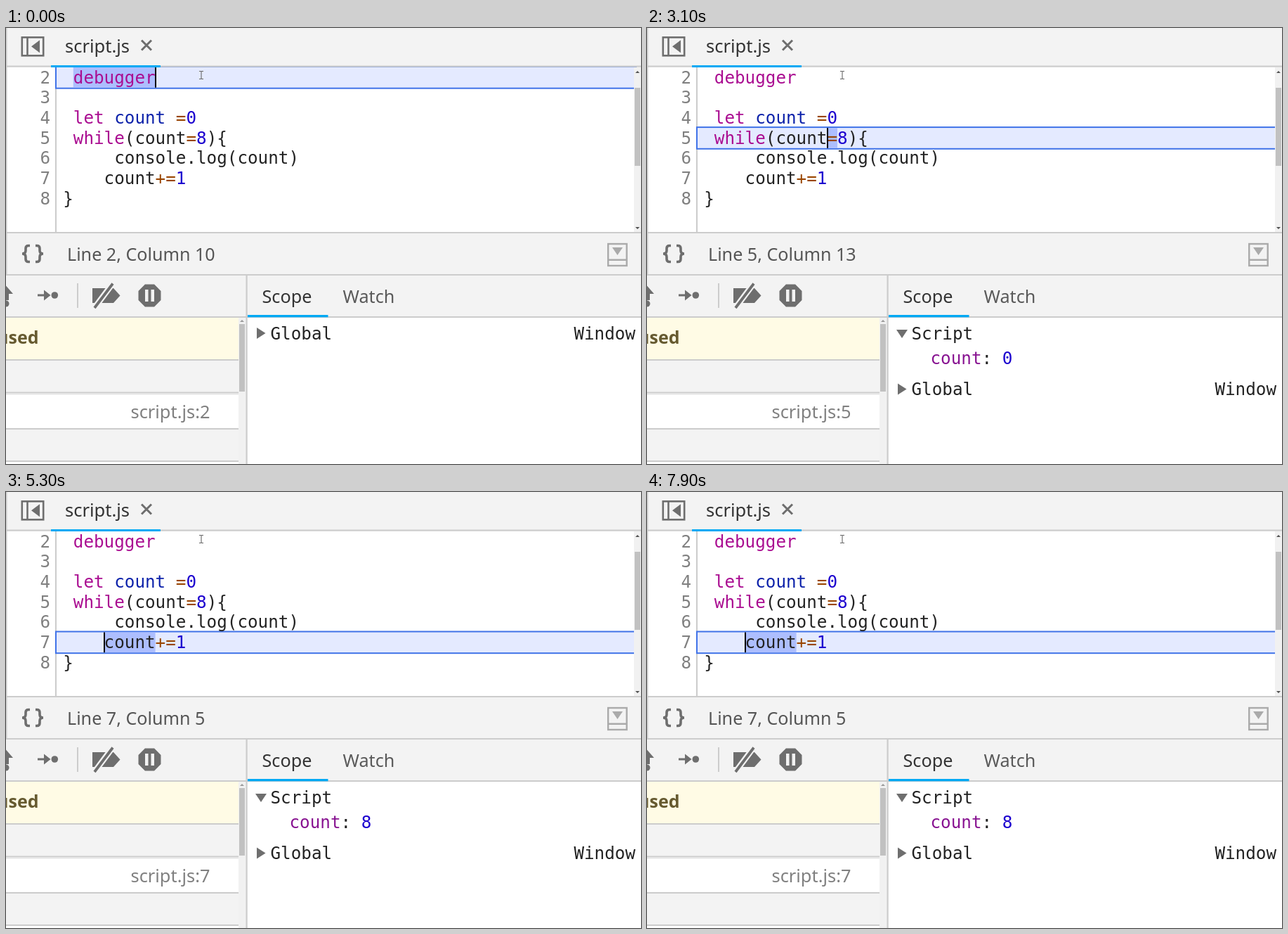
Recreate the animation shown at these times as an HTML page. Size 904x620 px, loop 8000 ms.

```html
<!DOCTYPE html>
<html lang="en">
<head>
<meta charset="utf-8">
<title>Stepping through a loop</title>
<style>
  html, body { margin: 0; width: 100%; height: 100%; overflow: hidden; background: #fff; }
  svg { display: block; width: 100vw; height: 100vh; }
  text { white-space: pre; font: 25.2px "Noto Sans", "Open Sans", sans-serif; fill: #333; }
  .mono { font: 24.25px "DejaVu Sans Mono", monospace; fill: #222; }
  .end { text-anchor: end; }
  .num { fill: #808080; }
  .note { font-style: italic; font-size: 25px; fill: #808080; }
  .kw { fill: #aa0d91; }
  .def { fill: #0d22aa; }
  .op { fill: #994500; }
  .val { fill: #1c00cf; }
  .prop { fill: #881391; }
  .bar { fill: #f3f3f3; }
  .rule { fill: #ccc; }
  .thumb { fill: #c1c1c1; }
  .blue { fill: #03a9f4; }
  .icon { fill: #6e6e6e; }
  .line { fill: none; stroke: #6e6e6e; stroke-width: 2.6; }
</style>
</head>
<body>
<svg viewBox="0 0 904 620">
  <rect width="904" height="620" fill="#fff"/>

  <!-- editor -->
  <rect class="rule" x="70" y="56" width="2" height="235"/>
  <g id="row">
    <rect x="71" y="-1" width="826" height="30.7" fill="#e4eaff" stroke="#4073e8" stroke-width="2"/>
    <rect id="mark" height="28.7" fill="#adbefe"/>
  </g>
  <g id="code"></g>
  <rect id="caret" width="2" height="28.7" fill="#000"/>
  <path d="M275 61.5h2.2l.8 .8 .8-.8h2.2M278 62v10M275 72.5h2.2l.8-.8 .8 .8h2.2" fill="none" stroke="#666" stroke-width="1.1"/>
  <rect x="894" y="56" width="10" height="235" fill="#f1f1f1"/>
  <rect class="thumb" x="895" y="85" width="8" height="111"/>
  <path d="M896 64l3-3 3 3zM896 283l3 3 3-3z" fill="#505050"/>

  <!-- tab strip -->
  <rect class="bar" width="904" height="54"/>
  <rect class="rule" y="53.5" width="904" height="2.2"/>
  <rect class="blue" x="64" y="53" width="156" height="3"/>
  <rect class="line" x="22.8" y="13.3" width="30.4" height="26"/>
  <path class="line" d="M30.5 13v27"/>
  <path class="icon" d="M36 26.3l12-9v18z"/>
  <text x="84" y="35" style="font-size:25.5px">script.js</text>
  <path class="line" d="M193 17.5l14 14M207 17.5l-14 14" style="stroke-width:3"/>

  <!-- status bar -->
  <rect class="bar" y="290" width="904" height="61"/>
  <rect class="rule" y="290" width="904" height="2"/>
  <path class="line" d="M34 309.5h-2q-4 0-4 4v3q0 4.500-5 4.500q5 0 5 4.500v3q0 4 4 4h2M42 309.500h2q4 0 4 4v3q0 4.500 5 4.500q-5 0-5 4.500v3q0 4-4 4h-2" style="stroke-width:3.600"/>
  <text id="status" x="87" y="330.500" style="font-size:25.100px;fill:#555"></text>
  <g fill="#aaa">
    <rect x="857.200" y="307" width="26.500" height="31" fill="none" stroke="#aaa" stroke-width="2.400"/>
    <path d="M863 312h15l-7.500 11zM857 328.500h27v2.400h-27z"/>
  </g>

  <!-- debugger toolbar -->
  <rect class="bar" y="350" width="904" height="61"/>
  <rect class="rule" y="350" width="904" height="2"/>
  <rect class="rule" y="410" width="904" height="2"/>
  <rect class="rule" width="1.500" height="351"/>
  <g class="icon">
    <path d="M0 366.500L10 378H4v9H0z"/>
    <circle cx="0" cy="392" r="4.500"/>
    <path d="M45 378.500h9v-6l9.500 7.500-9.500 7.500v-6h-9z"/>
    <circle cx="69.300" cy="380" r="4.800"/>
    <path d="M123 370h30l9.500 10.500-9.500 10.500h-30z"/>
    <path d="M197.900 364.500h13.200l9.400 9.400v13.200l-9.400 9.400h-13.200l-9.400-9.400v-13.200z"/>
  </g>
  <path d="M126 398L152 363" stroke="#f3f3f3" stroke-width="8.500"/>
  <path class="line" d="M126 398L152 363.500" style="stroke-width:3.800"/>
  <path d="M198 372h4.500v17H198zM206.500 372h4.500v17h-4.500z" fill="#f3f3f3"/>
  <rect class="rule" x="101" y="363" width="2" height="35"/>
  <text x="364.500" y="390.500">Scope</text>
  <text x="479.500" y="390.500" style="fill:#5a5a5a">Watch</text>
  <rect class="blue" x="344" y="408" width="114.500" height="3.300"/>

  <!-- call stack -->
  <rect y="412" width="331" height="60" fill="#fffbe5"/>
  <rect class="bar" y="472" width="331" height="47"/>
  <rect class="rule" y="471" width="331" height="2"/>
  <text class="end" x="46.500" y="449" style="font-size:25px;font-weight:700;fill:#665a30">Debugger paused</text>
  <rect class="rule" y="517.500" width="331" height="2"/>
  <g id="stack">
    <rect y="519.500" width="331" height="2" fill="#e6e6e6"/>
    <text id="place" class="end" x="290.500" y="555" style="font-size:25.400px;fill:#808080"></text>
    <rect class="bar" y="570" width="331" height="46"/>
    <rect class="rule" y="569" width="331" height="2"/>
    <rect class="rule" y="615" width="331" height="2"/>
  </g>
  <g id="idle">
    <text class="note end" x="122" y="557">Not paused</text>
    <rect class="bar" y="578" width="331" height="42"/>
    <rect class="rule" y="577" width="331" height="2"/>
    <text class="note" x="559" y="449">Not paused</text>
  </g>
  <rect x="331" y="412" width="11" height="208" fill="#f1f1f1"/>
  <path d="M333 418l3-3 3 3z" fill="#999"/>
  <rect id="thumb" class="thumb" x="332" y="421" width="8"/>
  <rect class="rule" x="341.500" y="351" width="2.200" height="269"/>

  <!-- scope -->
  <g id="script">
    <path class="icon" d="M355 429h16l-8 12z"/>
    <text class="mono" x="376.500" y="442.500">Script</text>
    <text class="mono" x="403.500" y="477.500"><tspan class="prop">count</tspan>: <tspan id="count" class="val"></tspan></text>
  </g>
  <g id="global">
    <path class="icon" d="M357 426v16l12.500-8z"/>
    <text class="mono" x="376.500" y="442.500">Global</text>
    <text class="mono end" x="896" y="442.500">Window</text>
  </g>
</svg>
<script>
const LOOP = 8000, LEFT = 81.2, CHAR = 14.6, ROW = 28.7;
const $ = id => document.getElementById(id);
const colX = col => LEFT + col * CHAR;
const rowY = line => 56 + (line - 2) * ROW;

const source = [' debugger', '', ' let count =0', ' while(count=8){',
  '     console.log(count)', '    count+=1', '}'];

// line: caret column, marked range
const stops = { 2: [9, 1, 9], 4: [12, 12, 13], 5: [12, 12, 13], 6: [5, 5, 12], 7: [4, 4, 9] };

// time, line, caret visible, paused, count
const steps = [
  [0, 2, 1, 1, null],
  [500, 2, 1, 0, null],
  [600, 2, 0, 0, null],
  [700, 4, 1, 1, null],
  [1200, 4, 0, 1, null],
  [1800, 4, 1, 1, null],
  [2300, 4, 0, 1, null],
  [3100, 5, 1, 1, 0],
  [3300, 5, 0, 1, 0],
  [3900, 5, 1, 1, 0],
  [4100, 5, 1, 0, 0],
  [4200, 6, 1, 1, 8],
  [4700, 6, 0, 1, 8],
  [5300, 7, 1, 1, 8],
  [5800, 7, 0, 1, 8],
  [6100, 7, 0, 0, 8],
  [6200, 5, 1, 1, 9],
  [6700, 5, 0, 1, 9],
  [7100, 6, 1, 1, 8],
  [7700, 6, 0, 1, 8],
  [7900, 7, 1, 1, 8]
];

function paint(text) {
  return text
    .replace(/(let )(count)|\b(debugger|while)\b|(\+?=)|(\d)/g, (all, lead, name, word, op) =>
      lead ? `<tspan class="kw">${lead}</tspan><tspan class="def">${name}</tspan>`
        : `<tspan class="${word ? 'kw' : op ? 'op' : 'val'}">${all}</tspan>`);
}

$('code').innerHTML = source.map((text, i) => {
  const y = rowY(i + 2) + 22.6;
  return `<text class="mono end num" x="63" y="${y}">${i + 2}</text>` +
    `<text class="mono" x="${LEFT}" y="${y}">${paint(text)}</text>`;
}).join('');

const set = (id, attrs) => {
  for (const key in attrs) $(id).setAttribute(key, attrs[key]);
};
const show = (id, on) => set(id, { visibility: on ? 'visible' : 'hidden' });

function draw(time) {
  const [, line, caretOn, paused, count] = steps.filter(step => step[0] <= time).pop();
  const [caret, from, to] = stops[line];
  const hasCount = paused && count !== null;

  show('row', paused);
  set('row', { transform: `translate(0 ${rowY(line)})` });
  set('mark', { x: colX(from), width: (to - from) * CHAR });
  show('caret', caretOn);
  set('caret', { x: Math.floor(colX(caret)), y: rowY(line) });
  $('status').textContent = `Line ${line}, Column ${caret + 1}`;

  show('stack', paused);
  show('idle', !paused);
  $('place').textContent = `script.js:${line}`;
  set('thumb', { height: paused ? 96 : 93 });

  show('script', hasCount);
  show('global', paused);
  set('global', { transform: `translate(0 ${hasCount ? 79.5 : 0})` });
  $('count').textContent = count;
}

const start = performance.now();
function tick() {
  draw((performance.now() - start) % LOOP);
  requestAnimationFrame(tick);
}
tick();
</script>
</body>
</html>
```
